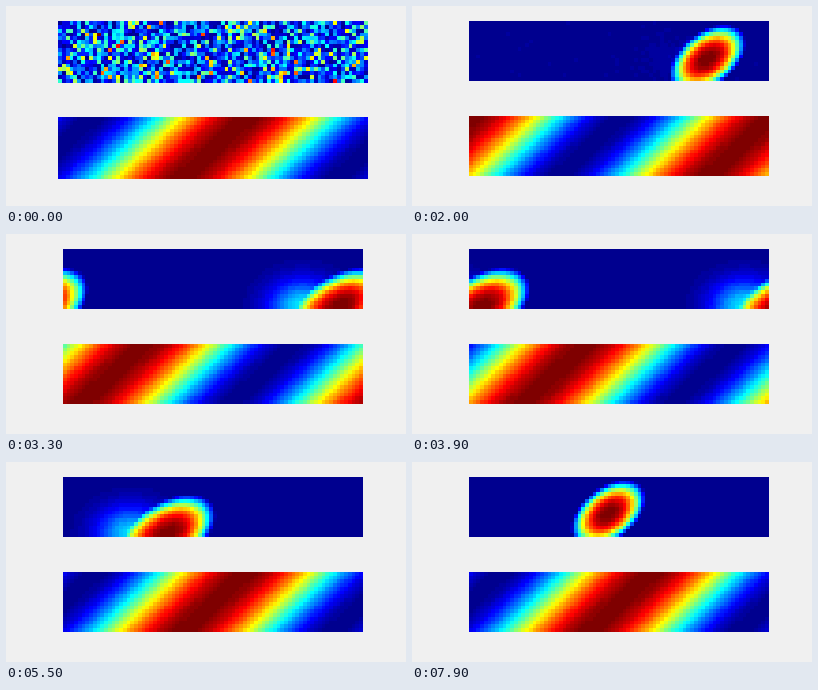
A matplotlib script for the animation above (8 s loop, 400x200 px).

```python
import numpy as np
import matplotlib.pyplot as plt
from matplotlib.animation import FuncAnimation
from matplotlib.colors import ListedColormap

W, H = 400, 200
COLS, ROWS = 80, 16
FRAMES, STEP = 80, 100
SWEEP = 50          # frames in which the wave travels one full width

# 64-level jet colour ramp
level = np.arange(1, 65)


def ramp(rise, fall):
    return np.clip(np.minimum((level - rise) / 16, (fall - level) / 16), 0, 1)


jet = ListedColormap(np.c_[ramp(24, 72), ramp(8, 56), ramp(-8, 40)])

x, y = np.meshgrid(np.arange(COLS) + 0.5, np.arange(ROWS) + 0.5)
noise = np.abs(np.random.default_rng(7).standard_normal((ROWS, COLS)))
noise /= noise.max()


def ease(t, start, end):
    p = np.clip((t - start) / (end - start), 0, 1)
    return p * p * (3 - 2 * p)


def crest(t):
    return 49 + COLS * min(t / SWEEP, 1)


def wave(t):
    slope = ROWS / (ROWS - 1)
    phase = x + 0.5 + slope * (y - 0.5) - crest(t)
    return (1 + np.cos(2 * np.pi * phase / COLS)) / 2


def bump(t):
    """Activity patch that trails the wave crest and sinks while it moves."""
    sink = ease(t, 18, 32) - ease(t, 53, 66)
    lag = 2 + 10.5 * (ease(t, 8, 32) - ease(t, 48, 60))
    slant = 0.97 - 0.52 * ease(t, 12, 19)      # a long band shrinks to an ellipse
    cy = 9.8 + 5.5 * sink
    cx = crest(t) - cy - lag

    skew = 1 - slant ** 2
    a = (8.9 + 2.5 * sink) / np.sqrt(skew)
    b = a - 1 - 1.4 * sink
    dx = (x - cx + 50) % COLS - 50
    dy = cy - y
    u, v = dx / a, dy / b
    r2 = (u * u + v * v - 2 * slant * u * v) / skew
    core = np.clip(1 - r2 ** 1.2, 0, 1)
    trail = 0.35 * sink * np.exp(-((dx + 10) / 9) ** 2 - (dy / 7) ** 2)
    return core + trail * (1 - core)


def activity(t):
    if t == 0:
        return noise
    gain = 0.04 * t + 0.8 * np.exp(0.5 * (t - 12))
    field = noise + gain * bump(t)
    return field / field.max()


fig = plt.figure(figsize=(W / 100, H / 100), dpi=100, facecolor="#f0f0f0")
ax = fig.add_axes([0, 0, 1, 1])
ax.axis("off")
panels = [ax.imshow(noise, cmap=jet, vmin=0, vmax=1, interpolation="nearest",
                    aspect="auto") for _ in range(2)]
ax.set(xlim=(0, W), ylim=(H, 0), autoscale_on=False)


def draw(t):
    # the panels open slightly larger, then settle
    left, width, height, low = (52, 310, 62, 111) if t == 0 else (57, 300, 60, 110)
    for panel, top, data in zip(panels, (15, low), (activity(t), wave(t))):
        panel.set_data(data)
        panel.set_extent((left, left + width, top + height, top))
    return panels


anim = FuncAnimation(fig, draw, frames=FRAMES, interval=STEP, repeat=True,
                     repeat_delay=0)
plt.show()
```
